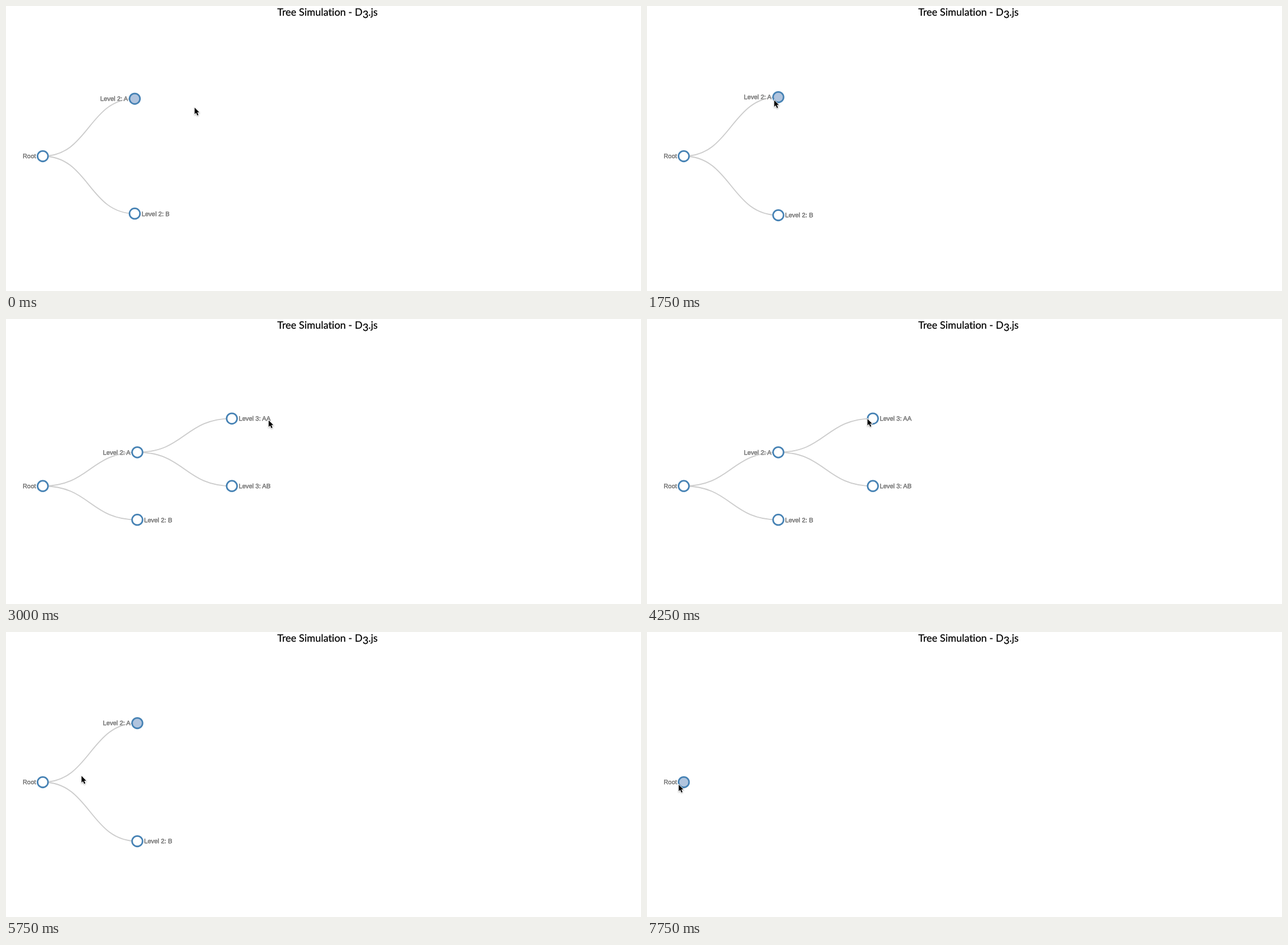
Write an HTML page that moves like this. It is 1117 px wide and 502 px high and loops after 8 s.

```html
<!DOCTYPE html>
<html lang="en">
<head>
<meta charset="utf-8">
<title>Tree Simulation - D3.js</title>
<style>
  html, body { margin: 0; width: 100%; height: 100%; overflow: hidden; background: #fff; }
  svg { display: block; width: 100%; height: 100%; }
  text { text-rendering: geometricPrecision; stroke: #000; stroke-width: .25px; }
  .title { font: 17.9px Lato, sans-serif; font-variant-ligatures: none; text-anchor: middle; }
  .link { fill: none; stroke: #ccc; stroke-width: 1.85px; }
  .node circle { fill: #fff; stroke: steelblue; stroke-width: 2.77px; }
  .node.closed circle { fill: lightsteelblue; }
  .node text {
    font: 11.09px "Liberation Sans", Arial, sans-serif;
    text-shadow: 0 1px #fff, 0 -1px #fff, 1px 0 #fff, -1px 0 #fff;
  }
  #cursor { stroke: #fff; stroke-width: 1.6px; paint-order: stroke; filter: drop-shadow(0 1px 1px rgba(0, 0, 0, .3)); }
</style>
</head>
<body>
<svg viewBox="0 0 1117 502">
  <text class="title" x="565.5" y="17">Tree Simulation - D<tspan dy="3.5">3</tspan><tspan dy="-3.5">.js</tspan></text>
  <g id="links"></g>
  <g id="nodes"></g>
  <path id="cursor" d="M.8 1v11.6l2.6-2.5 2.1 4.7 2-.9-2.1-4.6h3.6z"/>
</svg>
<script>
const LOOP = 8000, STEP = 250, DURATION = 750;
const RADIUS = 9.24, LABEL_GAP = 12;
const OPEN_ROOT = -608, OPEN_A = 1969, CLOSE_A = 4983, CLOSE_ROOT = 6980;

// Layout: column pitch, and row pitch with two or three leaves
const LEFT = 64.7, TOP = 56.5, HEIGHT = 416, COLUMN = 166.3;
const WIDE_ROW = HEIGHT / 2, TIGHT_ROW = HEIGHT / 3.5;

// Pointer glides: start, length, destination
const START = [331, 178];
const GLIDES = [
  [0, 500, 324, 176],
  [750, 1000, 223, 165],
  [2500, 300, 476, 178],
  [2800, 750, 392, 175],
  [4000, 250, 387, 175],
  [4250, 750, 229, 236],
  [5200, 1050, 48, 267],
  [6500, 250, 55, 268]
];

const mix = (a, b, k) => a + (b - a) * k;
const clamp = k => Math.min(1, Math.max(0, k));
const smooth = k => k * k * (3 - 2 * k);
const cubic = k => k < .5 ? 4 * k ** 3 : 1 - 4 * (1 - k) ** 3;
const byId = id => document.getElementById(id);

function add(parent, tag, attrs = {}) {
  const el = document.createElementNS("http://www.w3.org/2000/svg", tag);
  for (const name in attrs) el.setAttribute(name, attrs[name]);
  return parent.appendChild(el);
}

function makeNode(label, parent, inner) {
  const link = parent && add(byId("links"), "path", { class: "link" });
  const group = add(byId("nodes"), "g", { class: "node" });
  const circle = add(group, "circle");
  const text = add(group, "text", {
    x: inner ? -LABEL_GAP : LABEL_GAP, y: 3.9, "text-anchor": inner ? "end" : "start"
  });
  text.textContent = label;
  return { parent, link, group, circle, text };
}

const root = makeNode("Root", null, true);
const a = makeNode("Level 2: A", root, true);
const b = makeNode("Level 2: B", root);
const aa = makeNode("Level 3: AA", a);
const ab = makeNode("Level 3: AB", a);

// size shrinks the circle and fades the label while a node leaves
function place(node, x, y, size = 1) {
  Object.assign(node, { x, y });
  node.group.setAttribute("transform", `translate(${x} ${y})`);
  node.circle.setAttribute("r", RADIUS * size);
  node.text.setAttribute("opacity", size);
}

// open moves a pair of children out of their parent, row apart
function branch(parent, children, row, open, size) {
  children.forEach((node, i) => {
    const { x: px, y: py } = parent;
    const x = px + COLUMN * open, y = py + row * (i - .5) * open, mid = (x + px) / 2;
    place(node, x, y, size);
    node.link.setAttribute("d", `M${x} ${y}C${mid} ${y} ${mid} ${py} ${px} ${py}`);
    for (const el of [node.group, node.link]) el.setAttribute("display", open > 0 ? "inline" : "none");
  });
}

function pointerAt(t) {
  return GLIDES.reduce(([x, y], [start, length, toX, toY]) => {
    const k = smooth(clamp((t - start) / length));
    return [mix(x, toX, k), mix(y, toY, k)];
  }, START);
}

function draw(t) {
  const run = start => cubic(clamp((t - start) / DURATION));
  const rootSize = 1 - run(CLOSE_ROOT), leafSize = 1 - run(CLOSE_A);
  const rootOpen = run(OPEN_ROOT) * rootSize;
  const leafOpen = run(OPEN_A) * leafSize;

  place(root, LEFT, TOP + mix(WIDE_ROW, 2 * TIGHT_ROW, leafOpen));
  branch(root, [a, b], mix(WIDE_ROW, TIGHT_ROW, leafOpen), rootOpen, rootSize);
  branch(a, [aa, ab], TIGHT_ROW, leafOpen, leafSize);

  root.group.classList.toggle("closed", t >= CLOSE_ROOT);
  a.group.classList.toggle("closed", t < OPEN_A || t >= CLOSE_A);
  byId("cursor").setAttribute("transform", `translate(${pointerAt(t)})`);
}

function tick() {
  const t = performance.now() % LOOP;
  draw(Math.floor(t / STEP) * STEP);
  requestAnimationFrame(tick);
}
tick();
</script>
</body>
</html>
```
